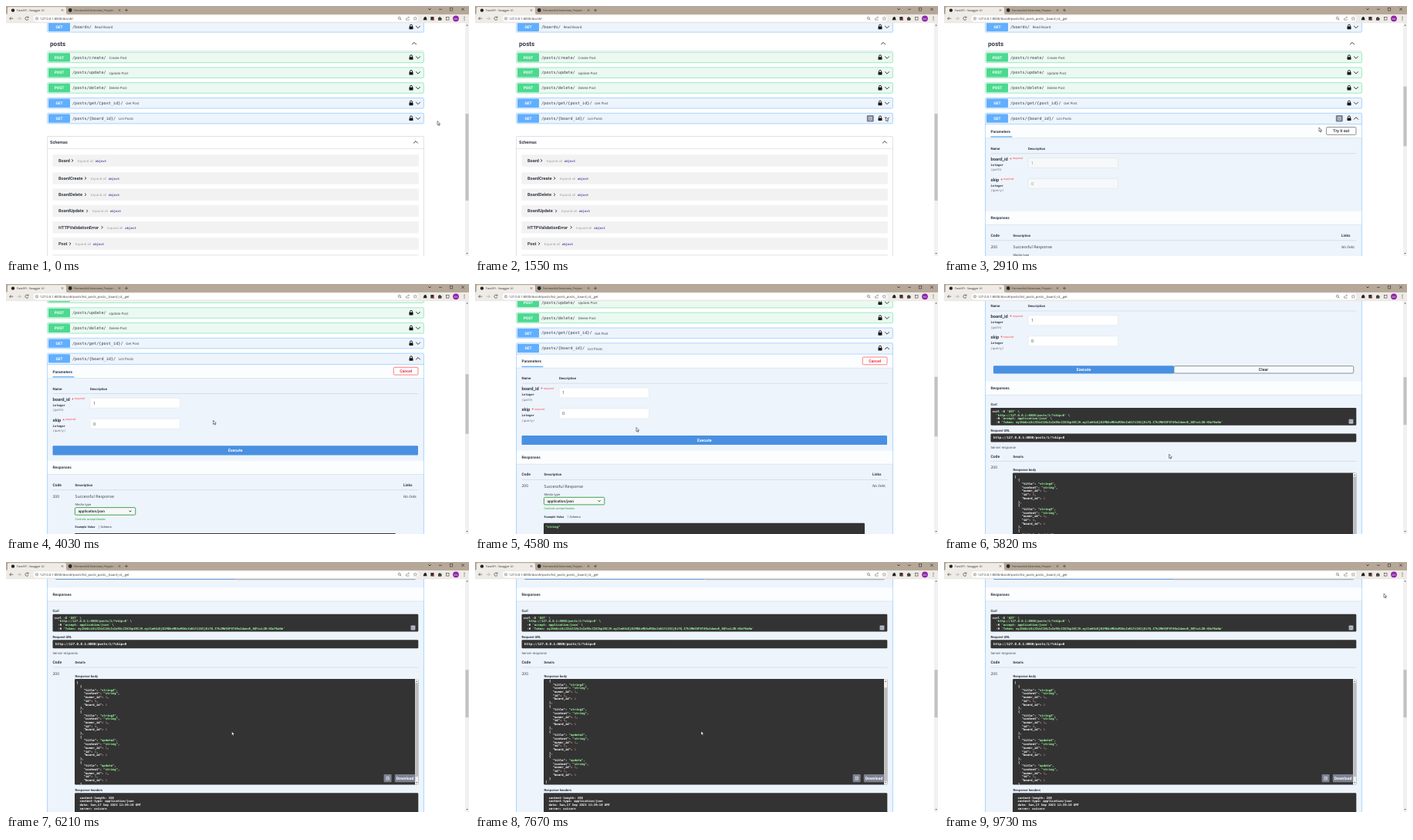
Animation, 600 px wide and 325 px high, one loop 9760 ms. Source, as an HTML page:

```html
<!DOCTYPE html>
<html lang="en">
<head>
<meta charset="utf-8">
<title>API docs walkthrough</title>
<style>
html, body { margin: 0; width: 100%; height: 100%; overflow: hidden; background: #fff; }
svg { display: block; }
text { font-family: Roboto, "Open Sans", sans-serif; fill: #343a48; white-space: pre; text-rendering: geometricPrecision; }
.ui { font-family: "Open Sans", sans-serif; }
.b { font-weight: 700; }
.mono { font-family: "DejaVu Sans Mono", "Noto Sans Mono", monospace; }
.mid { text-anchor: middle; }
.it { font-style: italic; }
</style>
</head>
<body>
<svg id="stage" width="600" height="325" viewBox="0 0 600 325">
  <defs>
    <clipPath id="view"><rect y="22" width="595" height="303"/></clipPath>
    <clipPath id="bodyClip"><rect x="89" y="402" width="441" height="137.5"/></clipPath>
  </defs>
</svg>
<script>
const NS = 'http://www.w3.org/2000/svg';
const INK = '#343a48', BLUE = '#61affe', GREEN = '#4cd990', DARK = '#333', STR = '#a2fca2', GREY = '#7d8293';
const PALE_BLUE = '#edf4fc', PALE_GREEN = '#ebf9f1', TOOLBAR = '#efebe6';
let parent = document.getElementById('stage');

function el(tag, attrs) {
  const e = document.createElementNS(NS, tag);
  for (const k in attrs) e.setAttribute(k, attrs[k]);
  return parent.appendChild(e);
}
function group(draw, attrs = {}) {
  const g = el('g', attrs), outer = parent;
  parent = g;
  draw();
  parent = outer;
  return g;
}
const rect = (x, y, width, height, fill, more) => el('rect', { x, y, width, height, fill, ...more });
const path = (d, stroke = INK, w = 0.8, fill = 'none') => el('path', { d, stroke, 'stroke-width': w, fill });
const line = (x1, x2, y, stroke = 'rgba(59,65,81,.3)', w = 0.4) => path(`M${x1} ${y}H${x2}`, stroke, w);
const dot = (cx, cy, r, fill) => el('circle', { cx, cy, r, fill });

function text(x, y, str, size, cls = '', fill) {
  const t = el('text', { x, y, 'font-size': size, class: cls });
  if (fill) t.style.fill = fill;
  t.textContent = str;
  return t;
}
// Text made of [string, colour] parts
function rich(x, y, parts, size) {
  const t = text(x, y, '', size, 'mono b', '#fff');
  for (const [str, fill] of parts) {
    const s = document.createElementNS(NS, 'tspan');
    s.textContent = str;
    s.style.fill = fill || '#fff';
    t.appendChild(s);
  }
}
function chevron(x, y, up, s = 2.8) {
  const d = up ? -s / 2 : s / 2;
  path(`M${x - s} ${y - d}L${x} ${y + d}L${x + s} ${y - d}`, '#222', 0.9);
}
function lock(x, y) {
  rect(x - 2.5, y - 0.7, 5, 3.6, '#111', { rx: 0.5 });
  path(`M${x - 1.5} ${y - 0.5}v-1.2a1.5 1.5 0 0 1 3 0v1.2`, '#111', 0.9);
}
function copyIcon(x, y, w, h) {
  rect(x, y, w, h, GREY, { rx: 1.2 });
  const cx = x + w / 2, cy = y + h / 2;
  rect(cx - 1.6, cy - 1.9, 3.2, 3.8, 'none', { stroke: '#fff', 'stroke-width': 0.6 });
  path(`M${cx - 0.6} ${cy}h2.2`, '#fff', 0.6);
}

function opRow(cy, method, url, summary, open) {
  const [c, pale] = method === 'GET' ? [BLUE, PALE_BLUE] : [GREEN, PALE_GREEN];
  if (!open) rect(53.6, cy - 6.8, 487.8, 13.6, pale, { rx: 1.3, stroke: c, 'stroke-width': 0.5 });
  rect(55, cy - 5.7, 28, 11.4, c, { rx: 1 });
  text(69, cy + 1.8, method, 4.9, 'b mid', '#fff');
  text(86, cy + 1.7, url, 5.2, 'mono');
  text(86 + url.length * 3.13 + 3.6, cy + 2, summary, 4.4, 'ui');
  lock(525, cy);
  chevron(534, cy, open);
}
function sectionHead(cy, title) {
  rect(53.9, cy - 8.7, 487.3, 17.4, 'rgba(255,255,255,.8)');
  line(53.9, 541.2, cy + 8.9, 'rgba(0,0,0,.12)', 0.6);
  text(60.5, cy + 1.9, title, 4.9, 'b');
}

function schemas() {
  rect(53.6, 169.1, 487.8, 500, '#fff', { rx: 1.3, stroke: 'rgba(59,65,81,.4)', 'stroke-width': 0.4 });
  text(57, 178.6, 'Schemas', 5.5, 'b');
  chevron(531, 176.6, true);
  line(53.6, 541.4, 185.1);
  const models = [['Board', 200.6, 86], ['BoardCreate', 223.6, 103], ['BoardDelete', 244.8, 103],
    ['BoardUpdate', 266.1, 105], ['HTTPValidationError', 287.4, 124.5], ['Post', 308.6, 83], ['PostCreate', 329.8, 100]];
  for (const [name, y, x] of models) {
    rect(60.5, y - 7.8, 474.3, 15.6, '#f2f2f2', { rx: 1.3 });
    text(68, y + 1.9, name, 5.6, 'b');
    path(`M${x - 0.8} ${y - 1.7}l1.7 1.7l-1.7 1.7`, '#222', 0.9);
    text(x + 6.8, y + 1.9, 'Expand all', 4.2, 'ui', '#999');
    text(x + 29.8, y + 1.8, 'object', 4, 'mono b', '#5555aa');
  }
}

function params() {
  sectionHead(162.4, 'Parameters');
  rect(60.5, 168.9, 27.8, 1.4, BLUE);
  text(60.5, 186.4, 'Name', 4.5, 'b');
  text(109, 186.4, 'Description', 4.3, 'b');
  line(60.5, 534.5, 191.3);
  [['board_id', 'path', 0, 85.2], ['skip', 'query', 27, 73.4]].forEach(([name, where, dy, x]) => {
    text(60.5, 200.6 + dy, name, 5.8, 'b');
    text(x, 200.4 + dy, '*', 5.4, 'b', '#f33');
    text(x + 3.6, 198.8 + dy, 'required', 3.7, '', '#f55');
    text(60.5, 207.4 + dy, 'integer', 3.9, 'mono b');
    text(60.5, 213.9 + dy, `(${where})`, 4, 'mono it', '#666');
  });
}
function inputs(fill, ink) {
  ['1', '0'].forEach((v, i) => {
    rect(109, 197 + i * 27, 116.5, 13, fill, { rx: 1.2, stroke: '#d4d8de', 'stroke-width': 0.4 });
    text(113, 205.6 + i * 27, v, 5.4, 'ui', ink);
  });
}
function button(x, w, label, c, ink) {
  rect(x, 157.1, w, 9.8, 'rgba(255,255,255,.7)', { rx: 1.2, stroke: c, 'stroke-width': 0.8 });
  text(x + w / 2, 163.9, label, 5.2, 'b mid', ink);
}

function docResponses() {
  sectionHead(275.2, 'Responses');
  text(60.5, 299.4, 'Code', 4.9, 'b');
  text(89.5, 299.2, 'Description', 4.4, 'b');
  text(515, 299.2, 'Links', 4.8, 'b');
  line(60.5, 534.5, 304.4);
  text(60.5, 314.4, '200', 5, 'ui');
  text(89.5, 314.6, 'Successful Response', 5.25, 'ui');
  text(515, 314.3, 'No links', 4.8, 'it ui');
  text(89.5, 324.8, 'Media type', 4, 'ui');
  rect(89.4, 327.2, 78.4, 9.6, '#f7f7f7', { rx: 1.2, stroke: '#2f9e3c', 'stroke-width': 0.9 });
  text(93.5, 333.7, 'application/json', 4.75, 'b');
  chevron(161, 332, false, 1.5);
  text(89.5, 343.4, 'Controls accept header.', 3.8, '', '#2f9e3c');
  text(89.5, 354, 'Example Value', 3.9, 'b');
  line(120.5, 121, 352.5, '#888', 4);
  text(122.5, 354, 'Schema', 3.9);
  rect(89, 360.6, 416, 60, DARK, { rx: 1.3 });
  text(91.5, 366.6, '"string"', 3.9, 'mono b', STR);
}

function liveResponse() {
  sectionHead(292, 'Responses');
  text(60.5, 315, 'Curl', 4.4, 'b');
  rect(60.5, 317.6, 473.8, 22.8, DARK, { rx: 1.3 });
  const token = ['eyJhbGciOiJIUzI1NiIsInR5cCI6IkpXVCJ9', 'eyJ1eHAiOjE2MDAxMDAxMDAsInN1YiI6IjEifQ', 'I7k2MWS5P8T4RnJdomvE_0QYxcLZB-H3uF6aNe'].join('.');
  ["curl -X 'GET' \\", "  'http://127.0.0.1:8000/posts/1/?skip=0' \\", "  -H 'accept: application/json' \\", `  -H 'Token: ${token}'`]
    .forEach((s, i) => rich(62.8, 323.6 + i * 4.69, s.split(/('.*')/).map(p => [p, p[0] === "'" && STR]), 3.89));
  copyIcon(524.3, 332.2, 6.4, 6.4);
  text(60.5, 348.5, 'Request URL', 4.3, 'b');
  rect(60.5, 351.1, 473.8, 11, DARK, { rx: 1.3 });
  text(64, 358, 'http://127.0.0.1:8000/posts/1/?skip=0', 4.15, 'mono b', '#fff');
  text(60.5, 370.4, 'Server response', 4.3, 'ui');
  text(60.5, 382.4, 'Code', 5, 'b');
  text(89.5, 382.2, 'Details', 4.3, 'b');
  line(60.5, 534.5, 387);
  text(60.5, 397, '200', 5, 'ui');
  text(89.5, 399.6, 'Response body', 4.3, 'b');
  rect(89, 402, 445.3, 137.5, DARK, { rx: 1.3 });
  group(() => { json = group(posts); }, { 'clip-path': 'url(#bodyClip)' });
  rect(530, 402, 4.3, 137.5, '#f1f1f1');
  path('M531 405.6l1.1 -1.4l1.1 1.4z', 'none', 0, '#555');
  path('M531 536.2l1.1 1.4l1.1 -1.4z', 'none', 0, '#555');
  bodyThumb = rect(530.3, 407, 3.7, 122, '#bdbdbd');
  copyIcon(489.6, 525.8, 10, 10.4);
  rect(503.8, 525.8, 26.4, 10.4, GREY, { rx: 1.2 });
  text(517, 532.8, 'Download', 5.1, 'b mid', '#fff');
  text(89.5, 547.5, 'Response headers', 4.3, 'b');
  rect(89, 550.2, 445.3, 30, DARK, { rx: 1.3 });
  ['content-length: 208', 'content-type: application/json', 'date: Sun,17 Sep 2023 12:39:10 GMT', 'server: uvicorn']
    .forEach((s, i) => text(95.5, 557.5 + i * 4.69, s, 3.89, 'mono b', '#fff'));
}
function posts() {
  const data = ['string4', 'string3', 'update2', 'update'].map((title, i) =>
    ({ title, content: 'string', owner_id: 1, id: [5, 4, 2, 1][i], board_id: 1 }));
  JSON.stringify(data, null, 2).split('\n').forEach((s, i) => {
    const m = s.match(/^(.*?: )("?)([^,]*)(,?)$/);
    const parts = m ? [[m[1]], [m[2] + m[3], m[2] ? STR : '#d36363'], [m[4]]] : [[s]];
    rich(91.3, 408.3 + i * 4.69, parts, 3.89);
  });
}

let json, bodyThumb, copyHover, closed, open, viewMode, tryMode, before, after;
const page = group(() => {
  opRow(26.9, 'GET', '/boards/', 'Read Board');
  text(57, 51.4, 'posts', 8.1, 'b');
  chevron(529, 48.3, true);
  line(53.5, 541.5, 58);
  opRow(66.5, 'POST', '/posts/create/', 'Create Post');
  opRow(86.3, 'POST', '/posts/update/', 'Update Post');
  opRow(106.1, 'POST', '/posts/delete/', 'Delete Post');
  opRow(125.9, 'GET', '/posts/get/{post_id}/', 'Get Post');
  const list = ['GET', '/posts/{board_id}/', 'List Posts'];
  closed = group(() => { opRow(145.7, ...list); schemas(); });
  open = group(() => {
    rect(53.6, 138.9, 487.8, 700, PALE_BLUE, { rx: 1.3, stroke: BLUE, 'stroke-width': 0.5 });
    opRow(145.7, ...list, true);
    line(53.6, 541.4, 153.3, BLUE, 0.5);
    params();
    viewMode = group(() => {
      button(495.6, 38.4, 'Try it out', '#777');
      inputs('#f6f8fa', '#888');
      docResponses();
    });
    tryMode = group(() => {
      button(502.3, 31.7, 'Cancel', '#ff6060', '#f0304a');
      inputs('#fff', INK);
      before = group(() => {
        rect(60.5, 259, 473.5, 12.2, '#4990e2', { rx: 1.2 });
        text(297.3, 267, 'Execute', 5.2, 'b mid', '#fff');
        group(docResponses, { transform: 'translate(0 12.2)' });
      });
      after = group(() => {
        rect(298, 262.9, 232.7, 9.4, '#f7fbff', { rx: 1.2, stroke: '#666', 'stroke-width': 0.7 });
        rect(64, 262.5, 234, 10.2, '#4990e2', { rx: 1.2 });
        text(181, 269.5, 'Execute', 5.2, 'b mid', '#fff');
        text(414, 269.5, 'Clear', 5.2, 'b mid');
        group(liveResponse, { transform: 'translate(0 -0.3)' });
      });
    });
  });
  copyHover = group(() => copyIcon(507.8, 141.5, 9, 8.6));
});
const frame = el('g', { 'clip-path': 'url(#view)' });
frame.appendChild(page);

// Page scrollbar
rect(595, 22, 5, 303, '#f1f1f1');
path('M596.3 25.6l1.3 -1.6l1.3 1.6z', 'none', 0, '#555');
path('M596.3 321l1.3 1.6l1.3 -1.6z', 'none', 0, '#555');
const thumb = rect(595.5, 0, 4, 100, '#c1c1c1');

// Browser window
rect(0, 0, 600, 11, '#b5a899');
path('M0 11Q2 11 2 9V3Q2 1.2 4 1.2H76Q78 1.2 78 3V9Q78 11 80 11Z', 'none', 0, TOOLBAR);
rect(0, 10.9, 600, 11.1, TOOLBAR);
line(0, 600, 21.9, '#ddd');
dot(9, 5.6, 2.2, '#222');
text(14, 7.1, 'FastAPI - Swagger UI', 3.75, 'ui', '#333');
dot(83.2, 5.5, 2.4, '#24292f');
text(88, 7.1, 'Fernmoth4/Interview_Project: ·', 3.75, 'ui', '#333');
const cross = (x, y, s, c) => path(`M${x - s} ${y - s}l${2 * s} ${2 * s}M${x + s} ${y - s}l${-2 * s} ${2 * s}`, c, 0.6);
cross(73, 5.5, 1.2, '#444');
cross(147, 5.5, 1.2, '#333');
path('M154 5.5h4M156 3.5v4', '#333', 0.6);
chevron(549, 4.2, false, 1.5);
path('M561 4.3h4', '#222', 0.6);
rect(575.2, 2.4, 3.6, 3.6, 'none', { stroke: '#222', 'stroke-width': 0.5 });
cross(592, 4.2, 1.8, '#222');
path('M9.3 16.2h-4.6m1.9 -1.9l-1.9 1.9l1.9 1.9', '#444', 0.7);
path('M14.7 16.2h4.6m-1.9 -1.9l1.9 1.9l-1.9 1.9', '#aaa', 0.7);
path('M28.7 14.9a2.1 2.1 0 1 0 .3 2M29 13.6v1.6h-1.6', '#444', 0.7);
rect(35.5, 12.2, 499, 8.2, '#fff', { rx: 4.1 });
el('circle', { cx: 40, cy: 16.3, r: 1.7, fill: 'none', stroke: '#555', 'stroke-width': 0.5 });
path('M40 16v1.3M40 15v.5', '#555', 0.5);
const url = text(44, 17.8, '', 4.16, 'ui', '#333');
el('circle', { cx: 509.8, cy: 15.8, r: 1.5, fill: 'none', stroke: '#555', 'stroke-width': 0.6 });
path('M511 17l1.3 1.3', '#555', 0.7);
path('M518.6 15.6v2.6h3.6v-1M519.8 16.6q0-2 2.6-2m-1-1l1 1l-1 1', '#555', 0.5);
path('M530.3 13.9l.7 1.6l1.7 .1l-1.3 1.1l.4 1.7l-1.5 -.9l-1.5 .9l.4 -1.7l-1.3 -1.1l1.7 -.1z', '#555', 0.4);
path('M540.7 18.3l1-3.4l1.6-1.2l1.6 1.2l.6 3.4z', 'none', 0, '#222');
rect(550.3, 14, 4.2, 4.4, '#333', { rx: 0.6 });
dot(554, 17.8, 1, '#d33');
path('M560 15h1.2a.9 .9 0 0 1 1.8 0h1.2v1.2a.8 .8 0 0 1 0 1.6v.9h-4.2z', 'none', 0, '#444');
rect(570.4, 14.3, 3.6, 3.8, 'none', { stroke: '#444', 'stroke-width': 0.6 });
dot(583, 16.3, 3.9, '#8e24aa');
text(583, 17.6, 'MK', 3.3, 'ui mid', '#fff');
[14.4, 16.3, 18.2].forEach(y => dot(594, y, 0.55, '#444'));

const cursor = el('path', { d: 'M0 0V5.2L1.2 4.1L2 6L2.9 5.6L2.1 3.8H3.7Z', fill: '#fff', stroke: '#111', 'stroke-width': 0.5 });

// Timeline: [ms, value, ...]
const LOOP = 9760, OPEN = 2780, TRY = 3420, RUN = 5150, TOP = 0.4;
const MOVES = [[0, 559, 149.5], [900, 559, 149.5], [1650, 531, 144], [2700, 482, 146], [2780, 482, 147], [2910, 486, 158],
  [3250, 511, 160], [3450, 511, 160], [4250, 214, 181], [4580, 209, 186.5], [4950, 216, 201], [5180, 216, 201],
  [5500, 291, 222], [6210, 292.5, 220.3], [7670, 293, 219.8], [8700, 293, 219.8], [9400, 570, 41]];
const SCROLL = [[0, 0], [3750, 0], [4150, 62.5], [5490, 62.5], [6150, 250]];
const INNER = [[0, 0], [6850, 0], [7050, 7.2], [8000, 7.2], [8200, 0]];

function at(keys, t) {
  let i = keys.length - 1;
  while (keys[i][0] > t) i--;
  const a = keys[i], b = keys[i + 1] || a;
  const u = b === a ? 0 : (t - a[0]) / (b[0] - a[0]), k = u * u * (3 - 2 * u);
  return a.slice(1).map((v, j) => v + (b[j + 1] - v) * k);
}
const show = (g, on) => { g.style.display = on ? '' : 'none'; };

function render(now) {
  const t = now % LOOP;
  const [x, y] = at(MOVES, t), [scroll] = at(SCROLL, t), [inner] = at(INNER, t);
  show(closed, t < OPEN);
  show(open, t >= OPEN);
  show(viewMode, t < TRY);
  show(tryMode, t >= TRY);
  show(before, t < RUN);
  show(after, t >= RUN);
  show(copyHover, t > 1500 && t < 2950);
  const address = '127.0.0.1:8000/docs#/' + (t < OPEN ? '' : 'posts/list_posts_posts__board_id__get');
  if (url.textContent !== address) url.textContent = address;
  page.setAttribute('transform', `translate(0 ${TOP - scroll})`);
  json.setAttribute('transform', `translate(0 ${-inner})`);
  bodyThumb.setAttribute('y', 407 + inner * 0.85);
  const height = t < OPEN ? 783 : t < RUN ? 1140 : 1427;
  thumb.setAttribute('y', 27 + (303 + scroll) / height * 292);
  thumb.setAttribute('height', 303 / height * 292);
  cursor.setAttribute('transform', `translate(${x} ${y})`);
  requestAnimationFrame(render);
}
render(performance.now());
</script>
</body>
</html>
```
